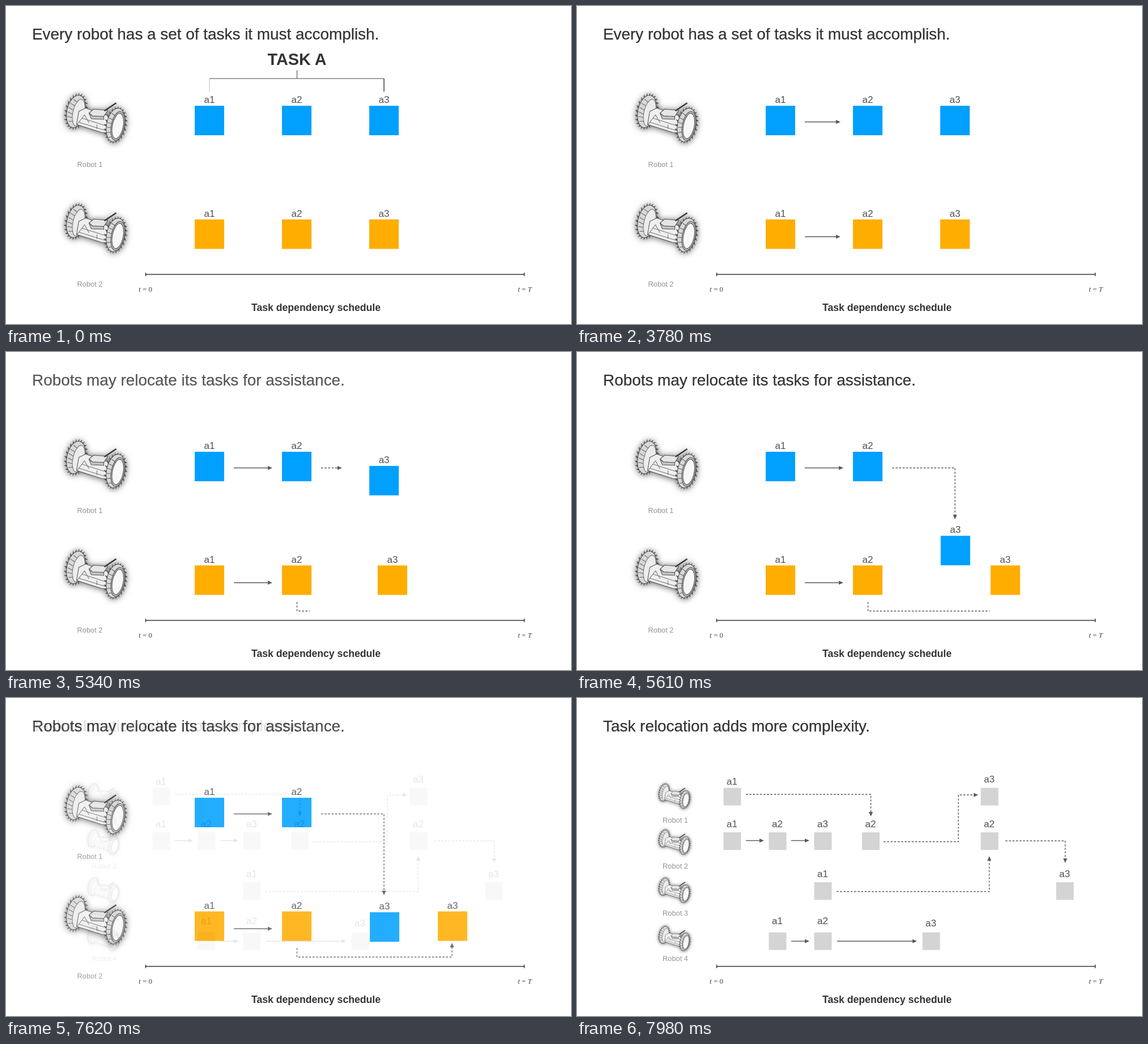
Recreate the animation shown at these times as an HTML page. Size 997x561 px, loop 8 s.

```html
<!DOCTYPE html>
<html lang="en">
<head>
<meta charset="utf-8">
<title>Task dependency schedule</title>
<style>
  html, body { margin: 0; width: 100%; height: 100%; overflow: hidden; background: #fff; }
  svg { display: block; width: 997px; height: 561px; font-family: "Liberation Sans", Arial, sans-serif; }
  .title { font-size: 27.9px; fill: #333; stroke: #333; stroke-width: 0.25; }
  .task { font-size: 28.8px; font-weight: bold; fill: #333; text-anchor: middle; }
  .caption { font-size: 17.65px; font-weight: bold; fill: #333; text-anchor: middle; }
  .label { font-size: 17px; fill: #505050; text-anchor: middle; }
  .robot { font-size: 12.8px; fill: #949494; text-anchor: middle; }
  .math { font: 13px "Liberation Serif", Times, serif; fill: #444; text-anchor: middle; }
  .math tspan { font-style: italic; }
  .line { fill: none; stroke: #5a5a5a; stroke-width: 1.4; }
  .head { fill: #5a5a5a; }
</style>
</head>
<body>
<svg viewBox="0 0 997 561">
  <defs>
    <g id="bot" stroke="#585858" stroke-width="1.1" style="filter: drop-shadow(0 1px 6px rgba(0,0,0,.62))">
      <g transform="translate(-35 -14) rotate(13)">
        <path class="claws" fill="#4a4a4a" stroke="none"/>
        <ellipse rx="16" ry="29" fill="#d8d8d8"/>
        <ellipse cx="5" cy="1" rx="10" ry="24" fill="#ececec" stroke="#777"/>
        <path d="M-13 -12l9 3M-14 -4l9 3M-14 4l9 2M-13 12l9 0M-9 20l8 -2M-9 -20l8 4" stroke="#666"/>
      </g>
      <path d="M-30 -14L-18 -20L28 -4L24 24L10 23L-34 9Z" fill="#efefef"/>
      <path d="M-30 5L18 20M-24 -2L20 12M-33 9L-20 -8L-12 6M2 9l0 8" fill="none" stroke="#777"/>
      <path d="M-12 -11L-4 -18L21 -16L14 -5L-6 -6Z" fill="#e6e6e6"/>
      <path d="M-12 -11L-6 -6L14 -5L14 0L-8 -1Z" fill="#c4c4c4"/>
      <path d="M15 -15L36 -29" stroke="#3a3a3a" stroke-width="2.6"/>
      <g transform="translate(35 10) rotate(11)">
        <path class="claws" fill="#4a4a4a" stroke="none"/>
        <ellipse rx="16" ry="30" fill="#d8d8d8"/>
        <path d="M-14 -10l8 2M-15 -2l8 1M-15 7l8 -1M-13 16l7 -2M-8 24l6 -3M-11 -19l7 3" stroke="#666"/>
        <ellipse cx="4" cy="1" rx="11.5" ry="26" fill="#bbb"/>
        <ellipse cx="4" cy="1" rx="9.5" ry="22.5" fill="#f8f8f8"/>
      </g>
    </g>
  </defs>
  <g id="pair"></g>
  <g id="team"><rect width="997" height="561" fill="#fff"/></g>
  <path d="M246.5 473.5H914.5M246.5 470.5v6M914.5 470.5v6" fill="none" stroke="#333" stroke-width="1.5"/>
  <text class="math" x="246" y="504"><tspan>t</tspan> = 0</text>
  <text class="math" x="915.5" y="504"><tspan>t</tspan> = <tspan>T</tspan></text>
  <text class="caption" x="547" y="538">Task dependency schedule</text>
</svg>
<script>
const pair = document.getElementById("pair");
const team = document.getElementById("team");
const BLUE = "#00a0ff", ORANGE = "#ffad00", GREY = "#d4d4d4";

function add(parent, tag, attrs = {}, content = "") {
  const node = document.createElementNS("http://www.w3.org/2000/svg", tag);
  for (const key in attrs) node.setAttribute(key, attrs[key]);
  node.textContent = content;
  return parent.appendChild(node);
}
const text = (parent, cls, x, y, content) => add(parent, "text", { class: cls, x, y }, content);

// Slanted teeth around the rim of a wheel
function claws(count) {
  const point = (angle, reach) => [Math.cos(angle) * (16 + reach), Math.sin(angle) * (29 + reach)];
  let d = "";
  for (let i = 0; i < count; i++) {
    const a = i / count * 2 * Math.PI;
    d += `M${point(a, -1)}L${point(a + 0.2, 5)}L${point(a + 0.18, -1)}Z`;
  }
  return d;
}
document.querySelectorAll(".claws").forEach(path => path.setAttribute("d", claws(24)));

function robot(parent, x, y, scale, number, labelX, labelY) {
  add(parent, "use", { href: "#bot", transform: `translate(${x} ${y}) scale(${scale})` });
  text(parent, "robot", labelX, labelY, "Robot " + number);
}

function box(parent, x, y, size, color, name, labelX, labelY) {
  const g = add(parent, "g");
  add(g, "rect", { x, y, width: size, height: size, fill: color });
  text(g, "label", labelX, labelY, name);
  return g;
}

// Arrow along a polyline; returns a function that draws the first part p of it.
function arrow(parent, points, dashed, headFrom = 0.03) {
  const line = add(parent, "path", { class: "line", "stroke-dasharray": dashed ? "3.6 2.6" : "none" });
  const head = add(parent, "path", { class: "head", d: "M0 0L-8 -3.6V3.6Z" });
  const lengths = points.slice(1).map(([x, y], i) => Math.hypot(x - points[i][0], y - points[i][1]));
  const total = lengths.reduce((a, b) => a + b);
  return p => {
    const hasHead = p >= headFrom;
    let left = p * total, d = "M" + points[0];
    for (let i = 0; i < lengths.length && left > 0; i++) {
      const [x0, y0] = points[i], [x1, y1] = points[i + 1];
      const dx = (x1 - x0) / lengths[i], dy = (y1 - y0) / lengths[i];
      const step = Math.min(left, lengths[i]);
      const x = x0 + dx * step, y = y0 + dy * step;
      left -= step;
      const last = left <= 0 || i === lengths.length - 1;
      const gap = last && hasHead ? Math.min(5, step) : 0;
      d += `L${x - dx * gap} ${y - dy * gap}`;
      const angle = Math.atan2(dy, dx) * 180 / Math.PI;
      head.setAttribute("transform", `translate(${x} ${y}) rotate(${angle})`);
    }
    line.setAttribute("d", d);
    line.style.display = p > 0 ? "" : "none";
    head.style.display = hasHead ? "" : "none";
  };
}

// Two robots
const firstTitle = text(pair, "title", 46, 59, "Every robot has a set of tasks it must accomplish.");
const secondTitle = text(pair, "title", 46, 59, "Robots may relocate its tasks for assistance.");
const task = add(pair, "g");
text(task, "task", 513.5, 104, "TASK A");
add(task, "path", { d: "M513.5 113.5V128M359 128H667", fill: "none", stroke: "#444" });
add(task, "path", { d: "M359 128V151", stroke: "#bbb" });
add(task, "path", { d: "M667 128V151", stroke: "#333", "stroke-width": 1.4 });
robot(pair, 158.5, 200, 1, 1, 148, 284);
robot(pair, 158.5, 394, 1, 2, 148, 495);
const row = (y, color, labelY) => [0, 1, 2].map(i =>
  box(pair, 333 + 154 * i, y, 52, color, "a" + (i + 1), 359 + 154 * i, labelY));
const blueLast = row(176, BLUE, 171)[2];
const orangeLast = row(376.5, ORANGE, 371.5)[2];
const straight = x => [204.5, 407].map(y => arrow(pair, [[x, y], [x + 68, y]]));
const firstArrows = straight(402);
const secondArrows = straight(556);
const blueRoute = arrow(pair, [[556, 204.5], [667, 204.5], [667, 348]], true);
const orangeRoute = arrow(pair, [[513.5, 441], [513.5, 457], [787, 457], [787, 432]], true, 0.93);

// Four robots
text(team, "title", 46, 59, "Task relocation adds more complexity.");
[[174, 219.5], [255, 300.5], [340, 383.5], [425, 463.5]].forEach(([y, labelY], i) =>
  robot(team, 172, y, 0.52, i + 1, 173.5, labelY));
[
  ["a1", 258.5, 158.5, 153], ["a3", 712.5, 158.5, 149],
  ["a1", 258.5, 237, 228], ["a2", 338.5, 237, 228], ["a3", 418.5, 237, 228],
  ["a2", 503, 237, 228], ["a2", 712.5, 237, 228],
  ["a1", 418.5, 325, 316], ["a3", 845.5, 325, 316],
  ["a1", 338.5, 413.5, 399], ["a2", 418.5, 413.5, 399], ["a3", 609.5, 413.5, 403]
].forEach(([name, x, y, labelY]) => box(team, x, y, 31, GREY, name, x + 15, labelY));
[
  [[298, 251.5], [330, 251.5]],
  [[378, 251.5], [410, 251.5]],
  [[378, 429], [410, 429]],
  [[459, 429], [600, 429]]
].forEach(points => arrow(team, points)(1));
[
  [[298, 170], [518.5, 170], [518.5, 209]],
  [[541, 253.5], [673, 253.5], [673, 171], [708, 171]],
  [[458, 341.5], [727.5, 341.5], [727.5, 279]],
  [[756, 252], [861.5, 252], [861.5, 291]]
].forEach(points => arrow(team, points, true)(1));

const progress = (t, start, duration) => Math.min(1, Math.max(0, (t - start) / duration));
const ease = p => p < 0.5 ? 4 * p ** 3 : 1 - 4 * (1 - p) ** 3;
const smooth = p => p * p * (3 - 2 * p);

function render(t) {
  const moved = t >= 5070;
  firstTitle.style.opacity = moved ? 0 : 1;
  secondTitle.style.opacity = progress(t, 5070, 330);
  task.style.opacity = 1 - progress(t, 2230, 300);

  firstArrows.forEach(draw => draw(ease(progress(t, 3065, 975))));
  secondArrows.forEach(draw => draw(moved ? 0 : ease(progress(t, 3880, 980))));

  const shift = moved ? ease(progress(t, 5040, 960)) : 0;
  blueLast.setAttribute("transform", `translate(${shift} ${202 * shift})`);
  orangeLast.setAttribute("transform", `translate(${121 * shift} 0)`);
  blueRoute(moved ? Math.max(0.004, ease(progress(t, 5040, 910))) : 0);
  orangeRoute(moved ? Math.max(0.004, shift) : 0);

  team.style.opacity = smooth(progress(t, 7510, 475));
}

const start = performance.now();
function frame() {
  render((performance.now() - start) % 8000);
  requestAnimationFrame(frame);
}
frame();
</script>
</body>
</html>
```
